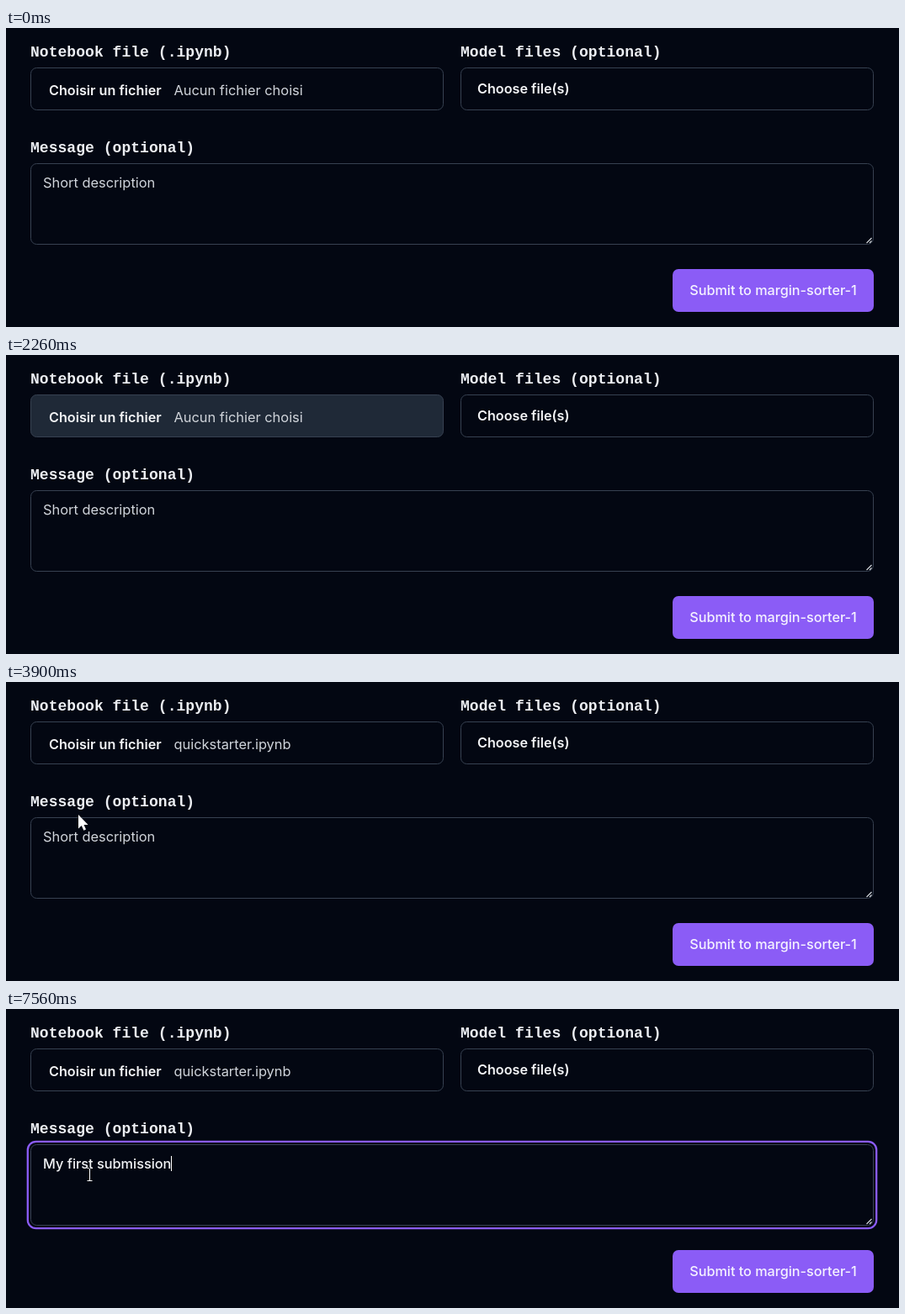
Recreate the animation shown at these times as an HTML page. Size 1061 by 356 pixels, loop 8 s.

```html
<!DOCTYPE html>
<html lang="en">
<head>
<meta charset="utf-8">
<title>Notebook submission form</title>
<style>
  html, body { margin: 0; width: 100%; height: 100%; overflow: hidden; background: #030712; }
  svg { display: block; }
  text { font: 400 16.4px Inter, "Open Sans", sans-serif; fill: #d1d5db; white-space: pre; }
  .label { font: 700 18px "Liberation Mono", "Noto Sans Mono", monospace; letter-spacing: .04px; fill: #eceef2; }
  .strong { font-weight: 600; font-size: 16.2px; fill: #f3f4f6; }
  .button { font-weight: 500; font-size: 16.2px; fill: #f5f3ff; text-anchor: middle; }
  .typed { font-weight: 500; font-size: 16.3px; fill: #f3f4f6; }
  .field { fill: #030712; stroke: #374151; }
  .pointer { fill: #fff; stroke: #10131c; stroke-width: .8; stroke-linejoin: round; paint-order: stroke; }
</style>
</head>
<body>
<svg width="1061" height="356" viewBox="0 0 1061 356">
  <text class="label" x="29" y="34">Notebook file (.ipynb)</text>
  <rect class="field" id="picker" x="29.5" y="47.5" width="490" height="50" rx="7"/>
  <text class="strong" x="51" y="80">Choisir un fichier</text>
  <text id="file" x="199.5" y="80"></text>

  <text class="label" x="540" y="34">Model files (optional)</text>
  <rect class="field" x="540.5" y="47.5" width="490" height="50" rx="7"/>
  <text class="strong" x="560" y="78">Choose file(s)</text>

  <text class="label" x="29" y="148">Message (optional)</text>
  <rect id="ring" x="25.8" y="157.8" width="1008.4" height="103.4" rx="10" fill="none" stroke="#8b5cf6" stroke-width="2.3"/>
  <rect class="field" x="29.5" y="161.5" width="1001" height="96" rx="7"/>
  <path d="M1022.5 256L1028.5 250M1026 256L1028.5 253.5" stroke="#d1d5db" stroke-width="1.2"/>
  <text id="hint" x="44" y="190" font-size="16.5">Short description</text>
  <text id="typed" class="typed" x="44" y="190"></text>
  <rect id="caret" y="175" width="1" height="18" fill="#fff"/>

  <rect x="792" y="287" width="239" height="51" rx="7" fill="#8b5cf6"/>
  <text class="button" x="911.5" y="318">Submit to margin-sorter-1</text>

  <g id="cursor">
    <circle id="click" r="13" fill="#cfd40f" fill-opacity=".68"/>
    <path id="arrow" class="pointer" d="M0 0V16.5L3.8 13L6.4 18.8L9 17.6L6.5 12H11.5z"/>
    <path id="hand" class="pointer" d="M-2 1.5a2 2 0 0 1 4 0V8.5q4 .2 6 1.6q2.5 .8 2.5 3.2v3.5q0 2-1 3.7v2.5h-9.5v-2.2q-2.5-3-5-6.3q-1.6-2.4-.8-3.6q1.6-1.4 4 1.3z"/>
    <path id="beam" d="M-2.5 -7.5H-.5M1.5 -7.5H3.5M.5 -7V7M-2.5 7.5H3.5" fill="none" stroke="#fff"/>
  </g>
</svg>
<script>
const LOOP = 8000;
const MESSAGE = "My first submission";
const el = id => document.getElementById(id);
const [picker, file, ring, hint, typed, caret, cursor, click] =
  ["picker", "file", "ring", "hint", "typed", "caret", "cursor", "click"].map(el);
const shapes = ["arrow", "hand", "beam"];

// Every track holds each value until the next time: [ms, ...values]
const moves = [
  [0, 0, 0, ""],
  [500, 749, 332, "arrow"], [630, 640, 240, "arrow"], [750, 520, 154, "arrow"],
  [880, 420, 88, "hand"], [1010, 358, 78, "hand"], [1130, 337, 74, "hand"],
  [1390, 326, 74, "hand"], [1650, 326, 72, "hand"], [1770, 326, 70, "hand"],
  [2140, 236, 9, "arrow"], [2260, 0, 0, ""],
  [3780, 78, 70, "hand"], [3900, 86, 158, "arrow"],
  [4030, 93, 180, "beam"], [4150, 97, 191, "beam"], [4280, 99, 196, "beam"],
  [4920, 99, 197, "beam"]
];
const hovers = [[0, 0], [880, 1], [3280, 0], [3780, 1], [3900, 0]];
const clicks = [[0, 0], [1390, 1], [1650, .6], [1770, 0], [4530, 1], [4660, 0]];
const focus = [[0, 0], [4530, .55], [4660, 1]];
const carets = [[0, 0], [4530, 1], [5050, 0], [5300, 1]];
const keys = [
  [0, 0], [5300, 1], [5550, 2], [5680, 3], [5800, 5], [5930, 6], [6060, 7], [6180, 8], [6310, 9],
  [6430, 10], [6560, 12], [6810, 13], [6940, 14], [7060, 15], [7180, 17], [7310, 18], [7560, 19]
];

function at(track, t) {
  let now = track[0];
  for (const step of track) if (step[0] <= t) now = step;
  return now.slice(1);
}

function draw() {
  const t = performance.now() % LOOP;
  const [x, y, shape] = at(moves, t);
  const [count] = at(keys, t);

  cursor.setAttribute("transform", `translate(${x} ${y})`);
  for (const id of shapes) el(id).style.display = id === shape ? "" : "none";
  click.style.opacity = at(clicks, t)[0];
  picker.style.fill = at(hovers, t)[0] ? "#1f2937" : "";
  file.textContent = t < 3020 ? "Aucun fichier choisi" : "quickstarter.ipynb";
  ring.style.opacity = at(focus, t)[0];

  hint.style.display = count ? "none" : "";
  typed.textContent = MESSAGE.slice(0, count);
  const width = count ? typed.getComputedTextLength() : 0;
  caret.setAttribute("x", Math.round(44 + width));
  caret.style.opacity = at(carets, t)[0];
  requestAnimationFrame(draw);
}
draw();
</script>
</body>
</html>
```
